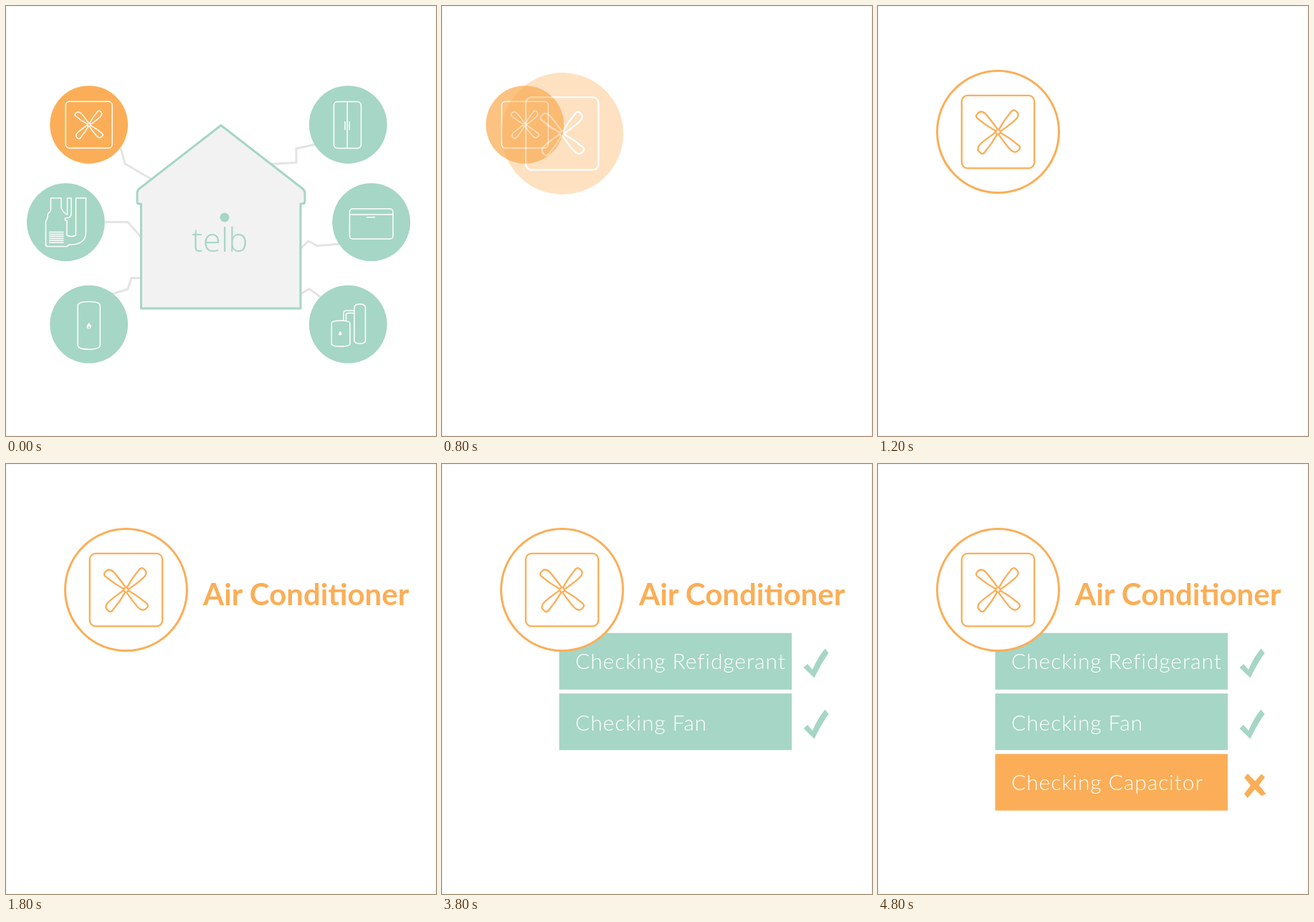
Write an HTML page that moves like this. It is 600 by 600 pixels and loops after 5.3 s.

```html
<!DOCTYPE html>
<html lang="en">
<head>
<meta charset="utf-8">
<title>Home appliance check</title>
<style>
  html, body { margin: 0; width: 100%; height: 100%; overflow: hidden; background: #fff; }
  svg { display: block; width: 100vw; height: 100vh; }
  text { font-family: Lato, "Open Sans", sans-serif; }
  .icon { fill: none; stroke: #fff; stroke-width: 1.5; stroke-linejoin: round; }
  .mint { fill: #a6d6c5; }
  .orange { fill: #fbae57; }
  .wire { fill: none; stroke: #e4e4e4; stroke-width: 3; }
  .solid { fill: #fff; stroke: none; }
  .label { font-size: 30px; font-weight: 300; letter-spacing: .9px; fill: #fff; }
</style>
</head>
<body>
<svg viewBox="0 0 600 600">
  <defs>
    <path id="blade" d="M-3-1C-12-6-23-14-29-19Q-32-22-29-25Q-25-30-20-27Q-16-25-1-4"/>
    <g id="fan" fill="none" stroke-width="2.3" stroke-linejoin="round">
      <rect x="-50.7" y="-50.7" width="101.4" height="101.4" rx="8"/>
      <use href="#blade"/>
      <use href="#blade" transform="rotate(90)"/>
      <use href="#blade" transform="rotate(180)"/>
      <use href="#blade" transform="rotate(270)"/>
      <circle r="3.2"/>
    </g>
    <path id="flame" d="M0-4Q4 0 3 3Q0 6-3 3Q-4 0 0-4Z"/>
    <path id="tick" d="M504.5 284L510 279L517 287Q524 270 534.5 257.5L539.5 264Q531 275 519.5 298.5Z"/>
  </defs>

  <g id="wires"></g>
  <g class="fade">
    <path d="M300 166.5L414 255Q417 257.5 417 261V272Q417 276 414 276H411V422H188.5V276H186Q183 276 183 272V261Q183 257.5 186 255Z"
      fill="#f2f2f2" stroke="#a6d6c5" stroke-width="3" stroke-linejoin="round"/>
    <circle class="mint" cx="305" cy="295" r="6.5"/>
    <text class="mint" x="298.5" y="343" text-anchor="middle" style="font:300 46px 'Open Sans',sans-serif">telb</text>
  </g>

  <g class="fade">
    <g id="discs" class="mint"></g>
    <g class="icon">
      <rect x="457.5" y="133.5" width="38" height="65" rx="5"/>
      <path d="M476.2 133.5V198.5M473 161V173M479.3 161V173"/>
      <rect x="479.5" y="283" width="60.5" height="42" rx="4"/>
      <path d="M479.5 291H540M503 294.7H515"/>
      <path d="M62.5 268H77V282Q82 291 85.5 291V268H91V290Q91 296 82.5 296V299H85V320Q91 323 97.5 320V268H111.5V315Q111.5 333 90 333H88Q86 335.5 84 335.5H58Q55.5 335.5 55.5 333V300Q58 298 58.5 290Q62.5 287 62.5 283Z"/>
      <path d="M60 315.5h20.5m-20.5 2.9h20.5m-20.5 2.9h20.5m-20.5 2.9h20.5m-20.5 2.9h20.5m-20.5 2.9h20.5"/>
      <path d="M100.2 418Q100.2 412.5 115.7 412.5T131.3 418V473Q131.3 479 115.7 479T100.2 473Z"/>
      <path d="M454.3 443Q454.3 439 467 439T480 443V471Q480 475 467 475T454.3 471Z"/>
      <path d="M486 421Q486 416 493.8 416T501.5 421V467Q501.5 471 493.8 471T486 467Z"/>
      <path d="M471 439V429Q471 425 475 425H486M474.6 439V430Q474.6 428.4 476.5 428.4H486"/>
    </g>
    <g class="solid">
      <use href="#flame" x="115.7" y="446"/>
      <circle class="mint" cx="115.7" cy="448.5" r="1.3"/>
      <use href="#flame" transform="translate(466.3 456.5) scale(.7)"/>
    </g>
  </g>

  <g id="small">
    <circle class="orange" cx="115.7" cy="165.6" r="54.4"/>
    <use href="#fan" stroke="#fff" transform="translate(115.7 165.7) scale(.64)"/>
  </g>

  <g id="rows"></g>
  <g id="filled">
    <circle class="orange" cx="168" cy="178" r="85"/>
    <use href="#fan" stroke="#fff" x="167.7" y="178"/>
  </g>
  <g id="outline" stroke="#fbae57">
    <circle cx="167.5" cy="175.6" r="85" fill="#fff" stroke-width="3"/>
    <use href="#fan" x="167.5" y="175.6"/>
  </g>
  <text id="title" class="orange" x="275" y="197" font-size="42" font-weight="700">Air Conditioner</text>
  <rect x=".5" y=".5" width="599" height="599" fill="none" stroke="#f4f4f4"/>
</svg>
<script>
const $ = id => document.getElementById(id);
const LOOP = 5300;

$('wires').innerHTML = [
  '160 198 166 220 212 247', '138 301.5 170 301.5 194 329',
  '148 402 170 395 175 379.5 195 379.5', '432 193 405 199 405 218.5 360 221',
  '466 332 434 334.5 422 328 404 345', '440 407 423 394.5 405 406'
].map(p => `<polyline class="wire fade" points="${p}"/>`).join('');

$('discs').innerHTML = [[477.3, 165.6], [83.4, 301.7], [509.7, 301.7], [115.7, 444.2], [477.3, 444.2]]
  .map(([x, y]) => `<circle cx="${x}" cy="${y}" r="54.4"/>`).join('');

const cross = '<path class="orange" d="M511 437.5L516 432L526 442.5L535 432.5L540 437L531.5 448L541.5 460.5L535 463L526 454L515.5 466L511 460L520 448.5Z"/>';
const rows = ['Refidgerant', 'Fan', 'Capacitor'].map((part, i) => ({ part, i, start: 2300 + 1000 * i }));
$('rows').innerHTML = rows.map(({ part, i }) => `
  <g id="row${i}">
    <rect id="bar${i}" x="163.5" y="${235.8 + 84.4 * i}" width="324.5" height="79"/>
    <text class="label" x="186" y="${[286, 372, 455][i]}">Checking ${part}</text>
    <g id="mark${i}">${i < 2 ? `<use href="#tick" class="mint" y="${85 * i}"/>` : cross}</g>
  </g>`).join('');

const fading = document.querySelectorAll('.fade');
const show = (el, opacity) => {
  el.style.opacity = opacity;
  el.style.display = opacity > 0 ? '' : 'none';
};
// Stepped ramp: takes one value per 100 ms from the start, then holds the last.
const steps = (t, start, before, values) =>
  t < start ? before : values[Math.min(values.length - 1, Math.floor((t - start) / 100))];

function draw(now) {
  const t = now % LOOP;
  const rest = steps(t, 500, 1, [.68, .36, 0]);
  fading.forEach(el => show(el, rest));
  show($('small'), steps(t, 800, 1, [.75, .5, .25, 0]));
  show($('filled'), steps(t, 800, 0, [.36, .68, 1, .5, 0]));
  show($('outline'), steps(t, 1100, 0, [.5, 1]));
  show($('title'), steps(t, 1700, 0, [.5, 1]));
  for (const { i, start } of rows) {
    const done = t >= start + 500;
    show($('row' + i), +(t >= start));
    show($('mark' + i), +done);
    $('bar' + i).setAttribute('class', i === 2 && done ? 'orange' : 'mint');
  }
  requestAnimationFrame(draw);
}
requestAnimationFrame(draw);
</script>
</body>
</html>
```
